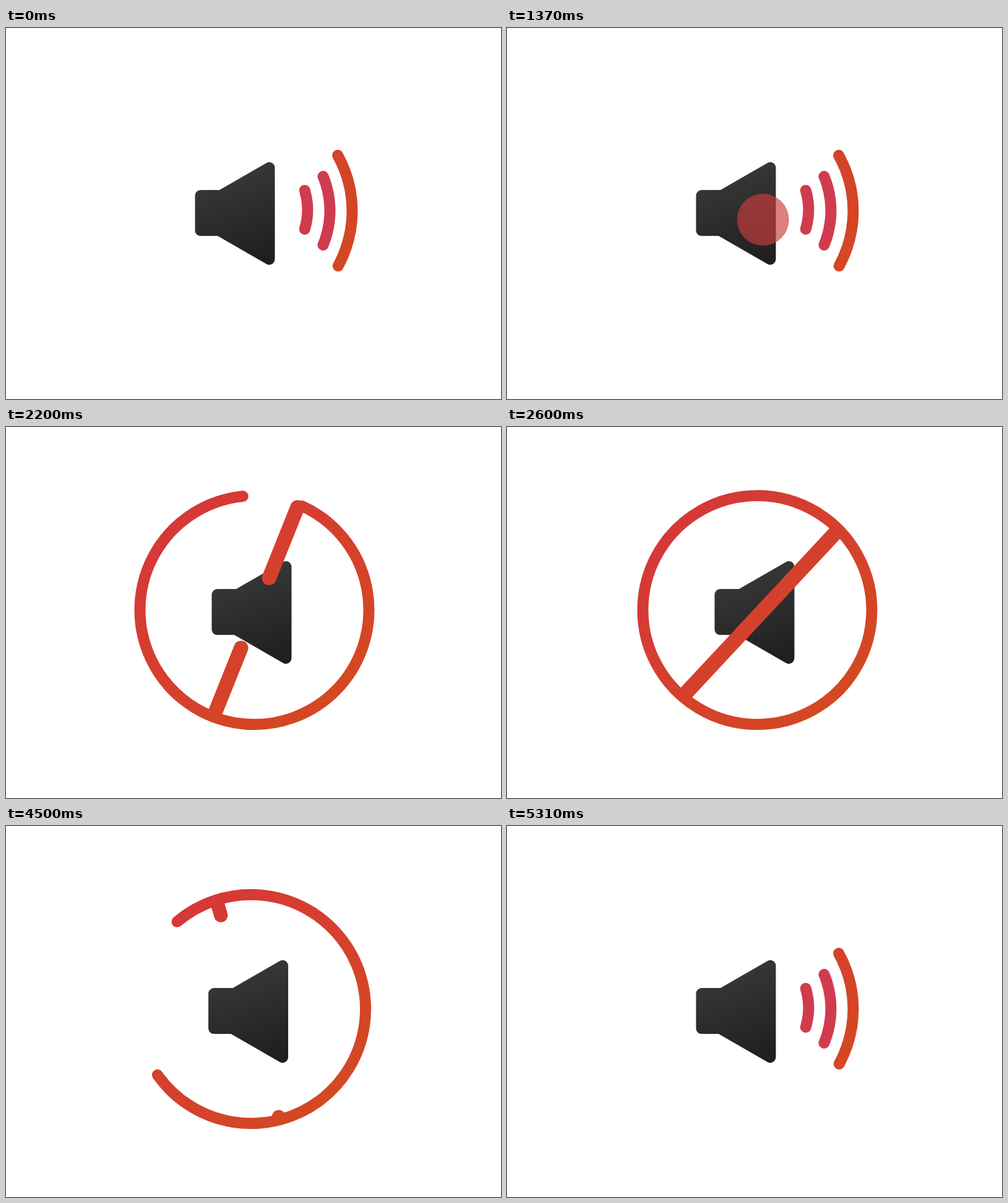
These frames come from a looping animation (800x600 px, 5550 ms). An HTML page:

```html
<!DOCTYPE html>
<html lang="en">
<head>
<meta charset="utf-8">
<title>Mute toggle</title>
<style>
  html, body { margin: 0; width: 100%; height: 100%; overflow: hidden; background: #fff; }
  svg { display: block; width: 100%; height: 100%; }
</style>
</head>
<body>
<svg viewBox="0 0 800 600">
  <defs>
    <linearGradient id="red" gradientUnits="userSpaceOnUse" x1="-137" y1="-137" x2="137" y2="137">
      <stop offset="0" stop-color="#d63838"/>
      <stop offset="1" stop-color="#d44822"/>
    </linearGradient>
    <linearGradient id="dark" gradientUnits="userSpaceOnUse" x1="345" y1="235" x2="400" y2="380">
      <stop offset="0" stop-color="#383838"/>
      <stop offset="1" stop-color="#1f1f1f"/>
    </linearGradient>
  </defs>
  <g id="speaker">
    <path d="M314.5 271H347.4L425.5 226V374L344.4 327.3H314.5Z" fill="url(#dark)"
      stroke="url(#dark)" stroke-width="18" stroke-linejoin="round"/>
  </g>
  <g id="rings" fill="none" stroke-width="18" stroke-linecap="round">
    <path id="inner" stroke="#d03c4e"/>
    <path id="middle" stroke="#d03c4e"/>
    <path id="slash" stroke="url(#red)"/>
    <path id="outer" stroke="url(#red)"/>
  </g>
  <circle id="tap" r="42" fill="#cb3c3e"/>
</svg>
<script>
const LOOP = 5550, RAD = Math.PI / 180;
const el = id => document.getElementById(id);
const [speaker, rings, inner, middle, slash, outer, tap] =
  ['speaker', 'rings', 'inner', 'middle', 'slash', 'outer', 'tap'].map(el);

const clamp = x => Math.min(1, Math.max(0, x));
const span = (t, start, length) => clamp((t - start) / length);

// Symmetric cubic-bezier(a, 0, 1 - a, 1), solved by bisection
function ease(x, a) {
  let lo = 0, hi = 1;
  for (let i = 0; i < 24; i++) {
    const s = (lo + hi) / 2, r = 1 - s;
    if (3 * r * r * s * a + 3 * r * s * s * (1 - a) + s ** 3 < x) lo = s; else hi = s;
  }
  return x <= 0 ? 0 : x >= 1 ? 1 : lo * lo * (3 - 2 * lo);
}

const point = (x, y) => x.toFixed(2) + ' ' + y.toFixed(2);

function arc(r, from, sweep, cx = 0, cy = 0) {
  const at = deg => point(cx + r * Math.cos(deg * RAD), cy + r * Math.sin(deg * RAD));
  const step = part => `A${r} ${r} 0 0 1 ${at(from + sweep * part)}`;
  return 'M' + at(from) + step(1 / 3) + step(2 / 3) + step(1);
}

function drawWave(path, r, cx, cy, half, open) {
  path.setAttribute('d', open > 0 ? arc(r, -half * open, 2 * half * open, cx, cy) : '');
}

// Two strokes grow from the ring and meet in the centre
function drawSlash(p) {
  const left = 1 - p, angle = (-47 - 210 * left) * RAD, shift = 7.2 - 44 * left;
  const c = Math.cos(angle), s = Math.sin(angle);
  const at = k => point(k * c - shift * s, k * s + shift * c);
  const stub = (tip, end) => Math.abs(tip) < 183 ? `M${at(tip)}L${at(end)}` : '';
  slash.setAttribute('d', stub(566 * left, 180) + stub(-645 * left, -180));
  slash.setAttribute('stroke-width', 18 + 6 * p);
}

function draw(t) {
  const p = t < 3000
    ? ease(span(t, 1367, 1233), .775)
    : 1 - ease(span(t, 3920, 1320), .775);
  const dx = 30 * p, open = clamp(1 - p / .2);

  speaker.setAttribute('transform', `translate(${dx} 0)`);
  rings.setAttribute('transform', `translate(${374.5 + dx} 296)`);
  outer.setAttribute('d', arc(185, -29.1 + 360 * p, 57.8 + 302.2 * p));
  drawWave(inner, 109, 3.9, -2, 16.7, open);
  drawWave(middle, 145.5, 3.5, -.5, 22.4, open);
  drawSlash(p);

  const move = ease(span(t, 740, 590), .333);
  tap.setAttribute('cx', 205 + 208.7 * move);
  tap.setAttribute('cy', 646 - 336 * move);
  tap.setAttribute('opacity', .66 * (1 - span(t, 1370, 230)));
}

function tick() {
  draw(performance.now() % LOOP);
  requestAnimationFrame(tick);
}
tick();
</script>
</body>
</html>
```
